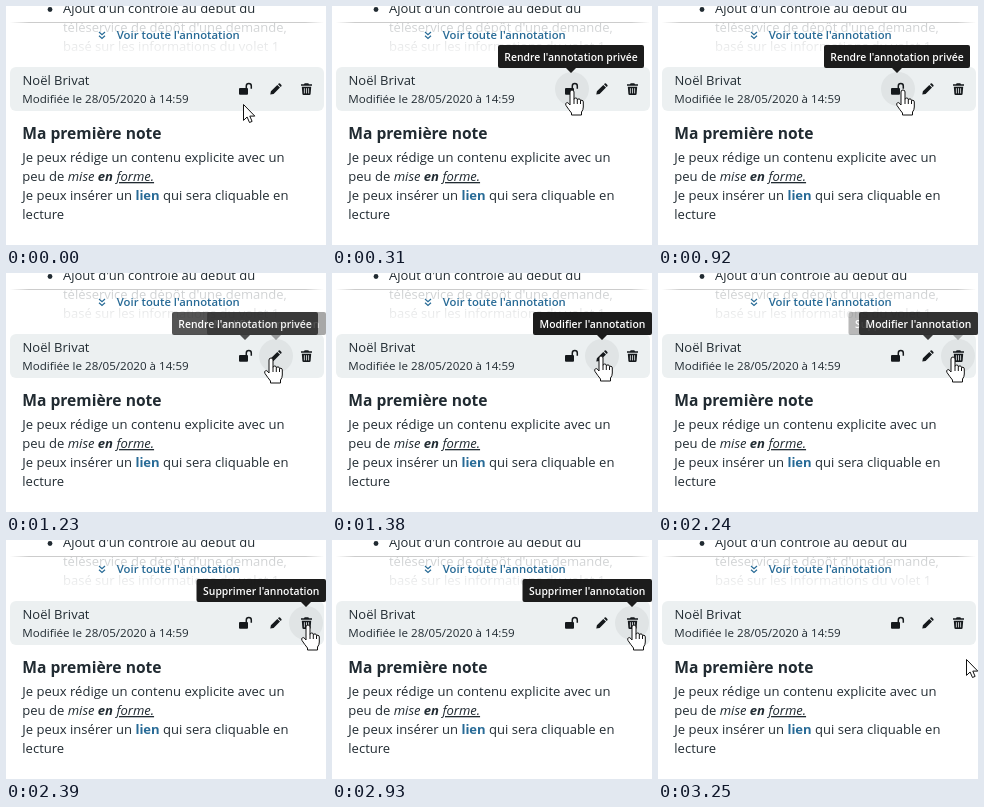
Recreate the animation shown at these times as an HTML page. Size 320 by 239 pixels, loop 3.33 s.

```html
<!DOCTYPE html>
<html lang="fr">
<head>
<meta charset="utf-8">
<style>
html, body { margin: 0; width: 100%; height: 100%; overflow: hidden; background: #fff; }
svg { display: block; }
text { font: 13px "Open Sans", "Noto Sans", sans-serif; fill: #212b32; white-space: pre; }
.body { font-size: 13.05px; }
.i { font-style: italic; }
.b { font-weight: 700; }
.u { text-decoration: underline; }
.title { font-size: 15.6px; font-weight: 700; }
.date { font-size: 11.6px; }
.more { font-size: 11.3px; font-weight: 600; }
.blue { fill: #276a96; }
.tip text { font-size: 10.4px; font-weight: 600; fill: #fff; text-anchor: middle; }
.tip path { fill: #101010; fill-opacity: .95; }
.cursor { fill: #fff; stroke: #111; stroke-width: 1; stroke-linejoin: round; }
</style>
</head>
<body>
<svg width="320" height="239" viewBox="0 0 320 239">
  <defs>
    <linearGradient id="fade" x2="0" y2="1">
      <stop offset="0" stop-color="#fff" stop-opacity=".76"/>
      <stop offset="1" stop-color="#fff" stop-opacity=".94"/>
    </linearGradient>
    <linearGradient id="edge">
      <stop offset="0" stop-color="#ccc" stop-opacity="0"/>
      <stop offset=".06" stop-color="#ccc"/>
      <stop offset=".94" stop-color="#ccc"/>
      <stop offset="1" stop-color="#ccc" stop-opacity="0"/>
    </linearGradient>
  </defs>

  <circle cx="44" cy="3.5" r="2.4" fill="#212b32"/>
  <text x="57" y="7">Ajout d'un contrôle au début du</text>
  <text x="57" y="26">téléservice de dépôt d'une demande,</text>
  <text x="57" y="45">basé sur les informations du volet 1</text>
  <rect x="4" y="16" width="314" height="31" rx="4" fill="url(#fade)"/>
  <rect x="4" y="16" width="314" height="1" fill="url(#edge)"/>
  <rect y="47" width="320" height="14" fill="#fff"/>
  <path d="M93 26l3 2.7 3-2.7m-6 3.7l3 2.7 3-2.7" fill="none" stroke="#276a96" stroke-width="1.2"/>
  <text class="more blue" x="110.8" y="33">Voir toute l'annotation</text>

  <rect x="4" y="61" width="314" height="44" rx="6" fill="#ecf0f1"/>
  <circle id="hover" cy="83" r="17" fill="#e0e4e5"/>
  <text x="16.5" y="79">Noël Brivat</text>
  <text class="date" x="16.2" y="97">Modifiée le 28/05/2020 à 14:59</text>

  <g fill="#15191c">
    <rect x="233" y="82" width="9" height="6.8" rx="1"/>
    <path d="M240.3 82.5v-2.4a2.5 2.5 0 0 1 5 0v2.6" fill="none" stroke="#15191c" stroke-width="1.5"/>
    <path d="M264.3 88.6l.6-3.3 6.4-6.4 2.7 2.7-6.4 6.4zM272 78.2l.7-.7q.7-.5 1.3 0l1.4 1.4q.5.6 0 1.3l-.7.7z"/>
    <path d="M295 78.3h3l.7-1.1h3.6l.7 1.1h3v1.5h-11zM295.8 80.7h9.4l-.6 7.2q-.1 1.1-1.2 1.1h-5.8q-1.1 0-1.2-1.1z"/>
    <path d="M298.4 82.2v5.2m2.1-5.2v5.2m2.1-5.2v5.2" stroke="#ecf0f1" stroke-width=".8"/>
  </g>

  <text class="title" x="16.3" y="133">Ma première note</text>
  <text class="body" x="16.3" y="156">Je peux rédige un contenu explicite avec un</text>
  <text class="body" x="16.3" y="175">peu de <tspan class="i">mise <tspan class="b">en</tspan> <tspan class="u">forme.</tspan></tspan></text>
  <text class="body" x="16.3" y="194">Je peux insérer un <tspan class="b blue">lien</tspan> qui sera cliquable en</text>
  <text class="body" x="16.3" y="213">lecture</text>

  <g id="tips"></g>
  <path id="arrow" class="cursor" d="M.5 .5V16.4l3.6-3.4 2.4 5.5 2.6-1.1-2.3-5.3h5z"/>
  <g id="hand" class="cursor">
    <path d="M-2 2Q-2 0 0 0T2 2V9.5Q2 8 3.7 8T5.3 9.5V10Q5.5 8.8 7 8.9T8.5 10.4V11Q8.8 10 10 10.2T11.3 12V17Q11.3 20 9.5 22V25H-.5V23Q-3 20-6 15.5Q-7 13.6-5.6 12.8T-3 13.8L-2 15Z"/>
    <path d="M2 9.5V14M5.3 10V14M8.5 11V14" fill="none"/>
  </g>
</svg>
<script>
const LOOP = 3330, STEP = 230 / 3;
const $ = id => document.getElementById(id);

// Periods in which the picture moves; it rests in between
const moves = [[80, 310], [920, 1380], [1930, 2390], [2930, 3250]];

// Pointer path: time, x, y
const path = [
  [0, 237, 98], [80, 238, 95], [310, 240, 84], [840, 240, 84], [1230, 265, 85],
  [1380, 269, 83], [1850, 269, 83], [2240, 295, 84], [2390, 302, 85],
  [2930, 302, 85], [3250, 308, 121]
];

const buttons = [240, 270, 300];

// Tooltips with fade-in and fade-out periods
const tips = [
  { text: "Rendre l'annotation privée", left: 166, right: 312, tail: 239, show: [140, 290], hide: [1180, 1370] },
  { text: "Modifier l'annotation", left: 201, right: 320, tail: 270, show: [1155, 1340], hide: [2210, 2380] },
  { text: "Supprimer l'annotation", left: 190.5, right: 320, tail: 300, show: [2180, 2360], hide: [3050, 3220] }
];

for (const tip of tips) {
  const { text, left, right, tail } = tip;
  $("tips").insertAdjacentHTML("afterbegin", `<g class="tip">
    <path d="M${left + 2} 39H${right - 2}q2 0 2 2V60q0 2-2 2H${tail + 5}l-5 5-5-5H${left + 2}q-2 0-2-2V41q0-2 2-2z"/>
    <text x="${(left + right) / 2}" y="54.5">${text}</text></g>`);
  tip.node = $("tips").firstElementChild;
}

const ramp = (t, [a, b]) => Math.min(1, Math.max(0, (t - a) / (b - a)));

// Holds each pose for one step
function quantise(t) {
  const move = moves.filter(m => m[0] <= t).pop();
  if (!move) return 0;
  const [start, end] = move;
  return Math.min(end, start + Math.floor((t - start + 4) / STEP) * STEP);
}

function pointer(t) {
  const i = Math.max(1, path.findIndex(p => p[0] >= t));
  const [a, b] = [path[i - 1], path[i]];
  const k = ramp(t, [a[0], b[0]]);
  return [1, 2].map(j => Math.round(a[j] + (b[j] - a[j]) * k));
}

function draw(now) {
  const t = quantise(now % LOOP);
  const [x, y] = pointer(t);
  const over = y < 98 ? buttons.find(c => Math.abs(x - c) <= 15) : undefined;

  $("hover").setAttribute("cx", over ?? -50);
  for (const [id, on] of [["hand", over], ["arrow", !over]]) {
    $(id).setAttribute("transform", `translate(${x} ${y})`);
    $(id).style.display = on ? "" : "none";
  }
  for (const { node, show, hide } of tips) {
    node.setAttribute("opacity", ramp(t, show) - ramp(t, hide));
  }
}

const begin = performance.now();
function tick() {
  draw(performance.now() - begin);
  requestAnimationFrame(tick);
}
tick();
</script>
</body>
</html>
```
